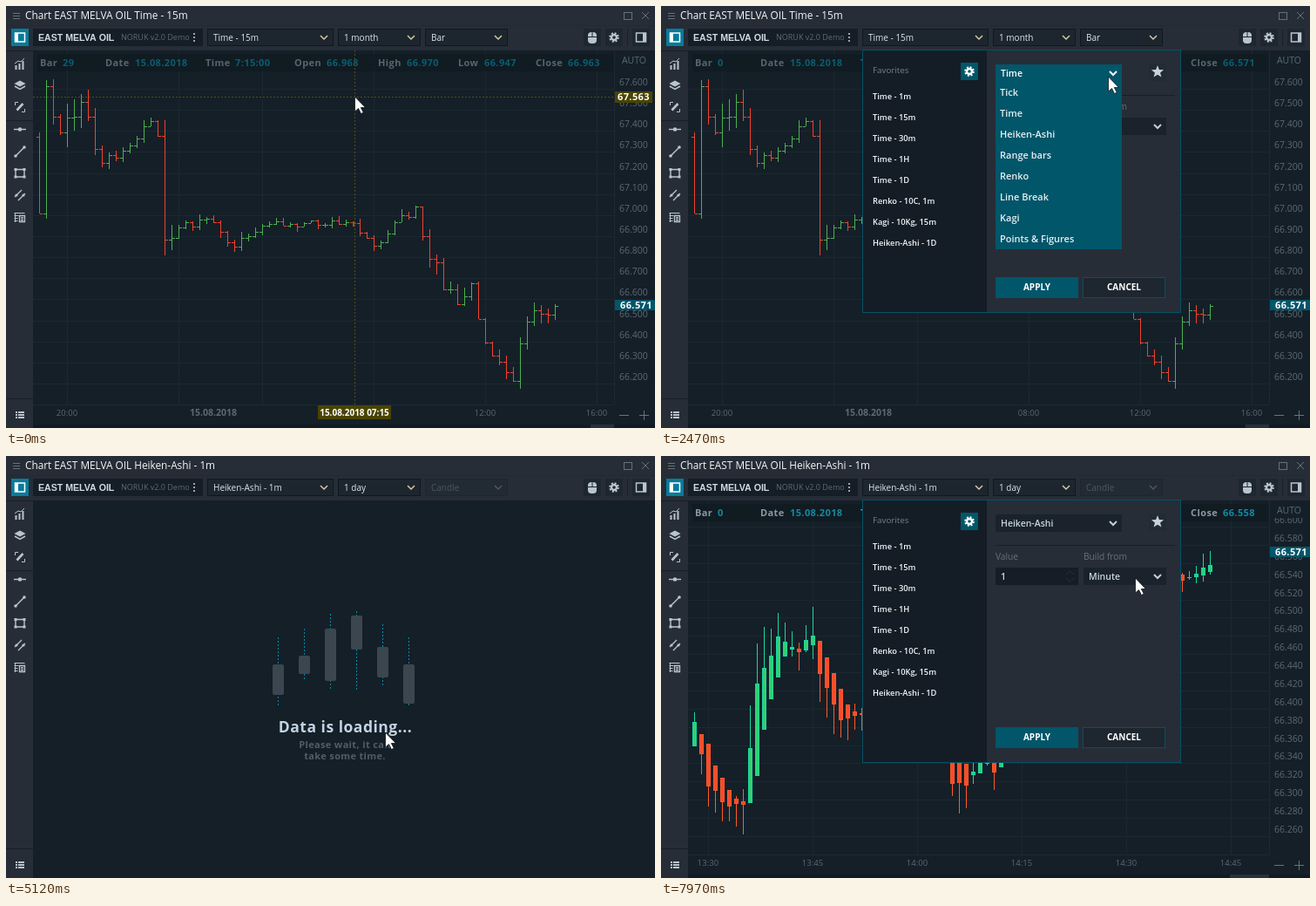
An HTML page with a canvas that plays this animation: 745x484 px, repeating every 8 s.

```html
<!DOCTYPE html>
<html lang="en">
<head>
<meta charset="utf-8">
<title>Chart</title>
<style>
html, body { margin: 0; width: 100%; height: 100%; overflow: hidden; background: #141f28; }
canvas { display: block; }
</style>
</head>
<body>
<canvas id="stage" width="745" height="484"></canvas>
<script>
const g = document.getElementById('stage').getContext('2d');
const LOOP = 8000, COUNT = 75;
const SANS = '"Open Sans", "Noto Sans", sans-serif';
const BG = '#141f28', PANEL = '#262d37', FIELD = '#151d26', ICON = '#b9c5ce', TEAL = '#02566a';
const SYMBOL = 'EAST MELVA OIL';

const clamp = (v, a, b) => Math.max(a, Math.min(b, v));
const mix = (a, b, k) => a + (b - a) * k;
const two = n => String(n).padStart(2, '0');

// linear track through key points [at, value, value]
function track(keys, at) {
  const i = keys.findIndex(k => k[0] > at);
  if (i < 0) return keys[keys.length - 1].slice(1);
  const a = keys[i - 1], b = keys[i], k = (at - a[0]) / (b[0] - a[0]);
  return [mix(a[1], b[1], k), mix(a[2], b[2], k)];
}

// price series in pixels: closes follow the keys [index, y, spread], wicks are random
function series(keys, start, seed, averaged) {
  const random = () => (seed = seed * 16807 % 2147483647) / 2147483647;
  const list = [];
  for (let i = 0; i < COUNT; i++) {
    const [y, spread] = track(keys, i), prev = list[i - 1];
    const isKey = keys.some(k => k[0] === i);
    const close = isKey ? y : y + (random() - .5) * spread * (averaged ? .3 : 1.1);
    const open = !prev ? start : averaged ? (prev.open + prev.close) / 2 : prev.close;
    const down = close > open;
    const tail = spread * (averaged ? .6 + .6 * random() : .8 * random());
    const back = !averaged || Math.abs(close - open) < 14 ? spread * .6 * random() : 0;
    list.push({ open, close, down,
      top: Math.min(open, close) - (down ? back : tail),
      low: Math.max(open, close) + (down ? tail : back) });
  }
  return list;
}

const bars = series([[0, 238, 12], [1, 92, 14], [3, 145, 30], [6, 110, 28], [9, 180, 22], [14, 152, 8],
  [16, 132, 12], [17, 149, 5], [18, 268, 36], [20, 254, 6], [24, 244, 9], [28, 276, 8], [32, 252, 9],
  [44, 247.7, 8], [45, 248.9, 8], [48, 275, 8], [54, 230, 10], [56, 290, 18], [60, 342, 18],
  [62, 318, 14], [64, 386, 12], [68, 430, 12], [70, 362, 22], [74, 343.5, 12]], 150, 4711, false);

const candles = series([[0, 305, 18], [2, 379, 25], [5, 402, 16], [7, 400, 30], [9, 261, 56], [12, 207, 24],
  [15, 225, 22], [17, 206, 34], [18, 250, 38], [21, 303, 26], [24, 297, 18], [27, 316, 27], [32, 271, 12],
  [34, 244, 12], [35, 263, 24], [37, 376, 22], [39, 378, 40], [41, 341.7, 24], [43, 363, 24], [44, 321, 28],
  [50, 290, 8], [52, 236, 40], [55, 254, 24], [58, 188, 18], [60, 222, 20], [62, 147, 54], [64, 152, 14],
  [67, 106, 36], [69, 147, 10], [74, 124.6, 14]], 333, 2018, true);

const quarters = [0, 1, 2, 3, 4, 5];
const charts = [
  { data: bars, name: 'Time', unit: '15m', span: '1 month', style: 'Bar',
    ref: 343.5, tag: 343, perPx: .0041425, first: 67.6, step: .1, y0: 87, dy: 24.14, rows: 15,
    minutes: 15, last: 870, thumb: 671, cross: '#564d12',
    grid: [70, 198, 294, 422, 550, 678],
    times: [['20:00', 70], ['15.08.2018', 238], ['08:00', 422], ['12:00', 550], ['16:00', 678]] },
  { data: candles, name: 'Heiken-Ashi', unit: '1m', span: '1 day', style: 'Candle',
    ref: 111, tag: 110, perPx: .00095785, first: 66.6, step: .02, y0: 73, dy: 20.88, rows: 18,
    minutes: 1, last: 882, thumb: 653, cross: '#39424a',
    grid: quarters.map(i => 54 + 120 * i),
    times: quarters.map(i => [`${13 + Math.floor((i + 2) / 4)}:${two((i + 2) % 4 * 15)}`, 54 + 120 * i]) }
];
const favorites = ['Time - 1m', 'Time - 15m', 'Time - 30m', 'Time - 1H', 'Time - 1D',
  'Renko - 10C, 1m', 'Kagi - 10Kg, 15m', 'Heiken-Ashi - 1D'];
const kinds = ['Tick', 'Time', 'Heiken-Ashi', 'Range bars', 'Renko', 'Line Break', 'Kagi', 'Points & Figures'];

// pointer stops: time, x, y
const stops = [[0, 400, 104], [380, 400, 104], [1000, 365, 38], [1560, 365, 38], [1620, 370, 44],
  [1970, 515, 76], [2270, 515, 76], [2530, 512, 82], [2780, 512, 82], [3240, 420, 145],
  [3520, 420, 145], [4170, 424, 195], [4940, 435, 317], [5990, 435, 317], [6290, 370, 135],
  [6740, 362, 35], [7140, 362, 35], [7610, 505, 78], [7970, 544, 140]];

function pointer(t) {
  const [x, y] = track(stops, t).map(Math.round);
  return { x, y };
}

function rect(x, y, w, h, color) { g.fillStyle = color; g.fillRect(x, y, w, h); }
function frame(x, y, w, h, color) {
  g.strokeStyle = color; g.lineWidth = 1;
  g.strokeRect(x + .5, y + .5, w - 1, h - 1);
}
function round(x, y, w, h, r, color) {
  g.fillStyle = color; g.beginPath(); g.roundRect(x, y, w, h, r); g.fill();
}
function text(s, x, y, size, color, weight = 400, align = 'left', gap = 0, family = SANS) {
  g.font = `${weight} ${size}px ${family}`;
  g.letterSpacing = gap + 'px';
  g.textAlign = align;
  g.fillStyle = color;
  g.fillText(s, x, y);
}
function stroke(d, color = ICON, w = 1) {
  g.strokeStyle = color; g.lineWidth = w;
  g.stroke(new Path2D(d));
}
function fill(d, color = ICON) { g.fillStyle = color; g.fill(new Path2D(d)); }
function dot(x, y, r, color = ICON) {
  g.fillStyle = color; g.beginPath(); g.arc(x, y, r, 0, 7); g.fill();
}
function dashed(d, color) { g.setLineDash([2, 2]); stroke(d, color); g.setLineDash([]); }
function chevron(x, y, color, w = 1.5) { stroke(`M${x - 4} ${y - 2}l4 4 4-4`, color, w); }
function gear(x, y, color) {
  g.strokeStyle = color;
  for (const [r, w, dash] of [[3, 2.4, []], [4.8, 2, [2, 1.77]]]) {
    g.setLineDash(dash); g.lineWidth = w;
    g.beginPath(); g.arc(x, y, r, 0, 2 * Math.PI); g.stroke();
  }
  g.setLineDash([]);
}
function sidePanel(x, y, side, color) {
  stroke(`M${x - 5.5} ${y - 5}h11v10h-11z`, color, 1.5);
  rect(side < 0 ? x - 5 : x + 2, y - 5, 3, 10, color);
}

function drawTools() {
  stroke('M11.5 73v-5M15.5 73v-7M19.5 73v-10', ICON, 2);
  stroke('M10 66l4-3 3 1 4-4');
  fill('M16 85.5l6.5 3.5-6.5 3.5-6.5-3.5z');
  stroke('M10 92l6 3.5 6-3.5', ICON, 1.5);
  stroke('M12.5 119.5l7-7.5', ICON, 2.6);
  stroke('M10.5 114v-3.5h3.5M21.5 118v3.5h-3.5');
  stroke('M9 141.5h14', ICON, 1.4); dot(16, 141.5, 2.3);
  stroke('M11 172l10-10', ICON, 1.4); dot(11, 172, 1.8); dot(21, 162, 1.8);
  stroke('M11 187.5h10v8.5h-10z', ICON, 1.4);
  for (const x of [11, 21]) for (const y of [187.5, 196]) rect(x - 1.5, y - 1.5, 3, 3, ICON);
  stroke('M10 219l8-8M14 223l8-8', ICON, 1.3);
  dot(12, 217, 1.6); dot(20, 217, 1.6);
  stroke('M9.5 237.5h12M9.5 240.5h5M9.5 243.5h4M9.5 246.5h4M10.5 237v11');
  stroke('M15.5 240.5h6v7h-6zM17 243h3M17 245.5h3', ICON, 1.3);
  for (const y of [465, 468, 471]) { rect(11, y, 2, 2, ICON); rect(14, y, 7, 2, ICON); }
}

function drawShell(c, mouse) {
  rect(0, 0, 745, 51, PANEL);
  rect(0, 51, 31, 433, PANEL);
  for (const y of [51, 131, 450]) rect(0, y, 31, 1, '#171f27');
  rect(0, 22, 745, 1, '#222932');
  stroke('M8 8.5h8M8 11.5h8M8 14.5h8', '#66717b');
  text(`Chart ${SYMBOL} ${c.name} - ${c.unit}`, 22, 15, 11.8, '#f4f7f9', 500);
  frame(709, 7, 10, 9, '#66717b');
  stroke('M730 7l8 8M738 7l-8 8', '#66717b');

  rect(6, 26, 20, 20, '#087b9b');
  sidePanel(16, 36, -1, '#fff');
  rect(31, 26, 195, 20, FIELD);
  text(SYMBOL, 37, 40, 10.6, '#cfdbe4', 700, 'left', 0, '"Liberation Sans", Arial, sans-serif');
  g.save();
  g.beginPath(); g.rect(131, 26, 79, 20); g.clip();
  text('NORUK v2.0 Demo', 132, 39, 9, '#5f6a74');
  g.restore();
  for (const y of [32, 36, 40]) dot(216, y, 1.1);

  [[231, 145, `${c.name} - ${c.unit}`], [381, 95, c.span], [481, 95, c.style]].forEach(([x, w, s]) => {
    const off = s === 'Candle';
    const over = mouse.y < 47 && mouse.y > 25 && mouse.x > x && mouse.x < x + w;
    rect(x, 26, w, 20, off ? '#222a33' : '#1d252e');
    frame(x, 26, w, 20, over ? '#66737e' : off ? '#1d252d' : '#10181f');
    text(s, x + 7, 40, 10, off ? '#4d5761' : '#dbe4ea', 500);
    chevron(x + w - 11, 36, off ? '#4d5761' : over ? '#fff' : '#d8c9a3');
  });

  for (const x of [663, 688, 719]) rect(x, 26, 20, 20, '#1e262f');
  rect(713, 26, 1, 20, '#171f27');
  round(668, 30, 10, 13, 4, ICON);
  stroke('M668 35.5h10M673 30v5', '#1e262f');
  gear(698, 36, ICON);
  sidePanel(729, 36, 1, ICON);
  drawTools();
}

function drawBar(x, b, focus) {
  const color = focus ? '#a34a20' : b.down ? '#f0432e' : '#4caf50';
  const y = Math.round(b.top);
  rect(x, y, focus ? 2 : 1, Math.round(b.low) - y, color);
  rect(x - 3, Math.round(b.open), 3, 1, color);
  rect(x + 1, Math.round(b.close), 3, 1, color);
}

function drawCandle(x, b, focus) {
  const edge = focus ? '#18a27e' : b.down ? '#ff5a2a' : '#17d9a2';
  const body = focus ? '#12332f' : b.down ? '#ff4a2a' : '#33cf6e';
  const y = Math.round(b.top), top = Math.round(Math.min(b.open, b.close));
  const h = Math.max(1, Math.round(Math.max(b.open, b.close)) - top);
  rect(x, y, 1, Math.round(b.low) - y, edge);
  rect(x - 2, top, 5, h, edge);
  if (h > 2) rect(x - 1, top + 1, 3, h - 2, body);
}

function drawChart(c, mouse, hover) {
  const price = y => (66.571 + (c.ref - y) * c.perPx).toFixed(3);
  const index = hover ? clamp(Math.round((mouse.x - 38.5) / 8), 0, COUNT - 1) : COUNT - 1;
  const back = COUNT - 1 - index, mins = c.last - back * c.minutes;
  const hour = Math.floor(mins / 60), min = two(mins % 60);

  g.save();
  g.beginPath(); g.rect(31, 51, 667, 406); g.clip();
  for (const x of c.grid) rect(x, 51, 1, 406, '#1c2831');
  for (let i = 0; i <= c.rows; i++) rect(31, Math.round(c.y0 + 8 + i * c.dy), 667, 1, '#1c2831');
  const mark = c.style === 'Bar' ? drawBar : drawCandle;
  c.data.forEach((b, i) => mark(38 + 8 * i, b, hover && i === index));
  rect(36, 55, 661, 20, 'rgba(15,25,33,.72)');
  const bright = c.style === 'Candle' && !hover;
  const b = c.data[index];
  [['Bar', 39, back, 65], ['Date', 114, '15.08.2018', 148], ['Time', 229, `${hour}:${min}:00`, 263],
    ['Open', 331, price(b.open), 368], ['High', 427, price(b.top), 460],
    ['Low', 519, price(b.low), 549], ['Close', 608, price(b.close), 645]].forEach(([k, x, v, vx]) => {
    text(k, x, 69, 11, bright ? '#8a98a2' : '#59656e', 700, 'left', .4);
    text(v, vx, 69, 11, bright ? '#1489a2' : '#0a5d71', 700, 'left', .4);
  });
  g.restore();

  rect(698, 51, 1, 406, '#1d2831');
  rect(31, 457, 667, 1, '#1d2831');
  for (let i = 0; i < c.rows; i++)
    text((c.first - i * c.step).toFixed(3), 704, c.y0 + 4 + i * c.dy, 10.5, '#5d6973');
  rect(699, 52, 46, 19, BG);
  text('AUTO', 721, 66, 10.5, '#5d6973', 400, 'center');
  for (const [s, x] of c.times) {
    const day = s.length > 5;
    text(s, x, 470, day ? 10.5 : 9.5, '#5d6973', day ? 700 : 400, 'center');
  }
  stroke('M704 469.5h11M727 469.5h11M732.5 464v11', '#67737d');
  rect(31, 480, 714, 4, '#111a22');
  rect(c.thumb, 480, 698 - c.thumb, 4, '#28313a');
  rect(699, c.tag - 6, 46, 12, TEAL);
  text('66.571', 705, c.tag + 4, 11, '#fff', 700, 'left', .4);

  if (hover) {
    dashed(`M${mouse.x + .5} 51V457`, c.cross);
    dashed(`M31 ${mouse.y + .5}H698`, '#564d12');
    rect(699, mouse.y - 6, 43, 13, '#4a4400');
    text(price(mouse.y), 702, mouse.y + 4, 11, '#fff', 700, 'left', .4);
    rect(mouse.x - 42, 458, 84, 16, '#4a4400');
    text(`15.08.2018 ${two(hour)}:${min}`, mouse.x, 470, 10, '#fff', 700, 'center');
  }
}

function drawLoading() {
  // body top, body height, wick above, wick below
  [[239, 35, 31, 14], [229, 21, 31, 8], [198, 60, 17, 9],
    [183, 39, 5, 48], [219, 35, 26, 11], [239, 45, 31, 4]].forEach(([y, h, up, down], i) => {
    const x = 312 + 30 * i;
    dashed(`M${x + .5} ${y - up}V${y + h + down}`, '#0b8ba6');
    round(x - 6, y, 13, h, 2, '#3c464e');
  });
  text('Data is loading...', 389.5, 317, 17.5, '#c3d3e2', 700, 'center', .5);
  text('Please wait, it can', 389, 335, 11, '#525d67', 700, 'center', .35);
  text('take some time.', 389, 348, 11, '#525d67', 700, 'center', .35);
}

function combo(x, y, w, s, active) {
  rect(x, y, w, 20, active ? TEAL : '#1a222b');
  text(s, x + 6, y + 14, 10.5, active ? '#fff' : '#cbd6de', 600);
  chevron(x + w - 10, y + 10, active ? '#fff' : '#c3ced6', 2);
}

function drawStar(x, y) {
  let d = '';
  for (let i = 0; i < 10; i++) {
    const r = i % 2 ? 3.2 : 7.5, a = i * Math.PI / 5;
    d += `${i ? 'L' : 'M'}${x + r * Math.sin(a)} ${y - r * Math.cos(a)}`;
  }
  fill(d + 'z', '#c6d2da');
}

function drawDialog(t, mouse, fade) {
  const picked = t >= 3520, open = t >= 2270 && !picked;
  g.globalAlpha = fade;
  rect(231, 50, 366, 302, PANEL);
  rect(232, 51, 142, 300, '#141d26');
  frame(231, 50, 366, 302, '#075063');
  text('Favorites', 243, 77, 9.8, '#73808a');
  rect(344, 65, 20, 20, TEAL);
  gear(354, 75, '#fff');
  favorites.forEach((s, i) => text(s, 243, 107 + 24 * i, 9.3, '#f4f7f9', 600));

  rect(560, 66, 20, 20, '#222a33');
  drawStar(570, 75.5);
  rect(384, 102, 206, 1, '#191f27');
  text('Value', 384, 119, 10.2, '#65717b');
  text('Build from', 485, 119, 10.2, '#65717b');
  rect(384, 128, 95, 20, FIELD);
  text(picked ? '1' : '15', 390, 142, 10.5, '#cbd6de', 600);
  stroke('M465 136l4.5-4 4.5 4M465 140l4.5 4 4.5-4', '#28323b');
  combo(485, 128, 95, 'Minute', false);
  combo(384, 67, 145, picked ? 'Heiken-Ashi' : 'Time', t >= 2120 && !picked);

  const onApply = mouse.x > 384 && mouse.x < 479 && mouse.y > 310 && mouse.y < 335;
  rect(384, 311, 95, 24, mouse.y < 51 || onApply ? '#0882a2' : TEAL);
  text('APPLY', 431.5, 326, 10, '#fff', 700, 'center');
  rect(484, 311, 95, 24, '#1e262f');
  frame(484, 311, 95, 24, '#075063');
  text('CANCEL', 531.5, 326, 10, '#fff', 700, 'center');

  if (open) {
    rect(384, 87, 145, 192, TEAL);
    const row = Math.floor((mouse.y - 87) / 24);
    if (row >= 0) rect(384, 87 + 24 * row, 145, 24, '#02708a');
    kinds.forEach((s, i) => text(s, 389, 103 + 24 * i, 11, '#e6eff3', 600));
  }
  g.globalAlpha = 1;
}

function drawPointer({ x, y }) {
  const arrow = 'M.5 0V17l4-3.5 3 6 2.8-1.3-3-5.7H12.5z';
  g.save();
  g.translate(x, y);
  fill(arrow, '#fff');
  stroke(arrow, '#10151a', .8);
  g.restore();
}

function draw(t) {
  const mouse = pointer(t), late = t >= 5020, c = charts[late ? 1 : 0];
  const loading = late && t < 5250;
  const openAt = late ? 6850 : 1150, dialog = t >= openAt;
  rect(0, 0, 745, 484, BG);
  if (loading) drawLoading();
  else drawChart(c, mouse, !dialog && mouse.y > 51);
  drawShell(c, mouse);
  if (dialog) drawDialog(t, mouse, Math.min(1, (t - openAt) / 200));
  drawPointer(mouse);
}

const begin = performance.now();
function tick() {
  draw((performance.now() - begin) % LOOP);
  requestAnimationFrame(tick);
}
tick();
</script>
</body>
</html>
```
